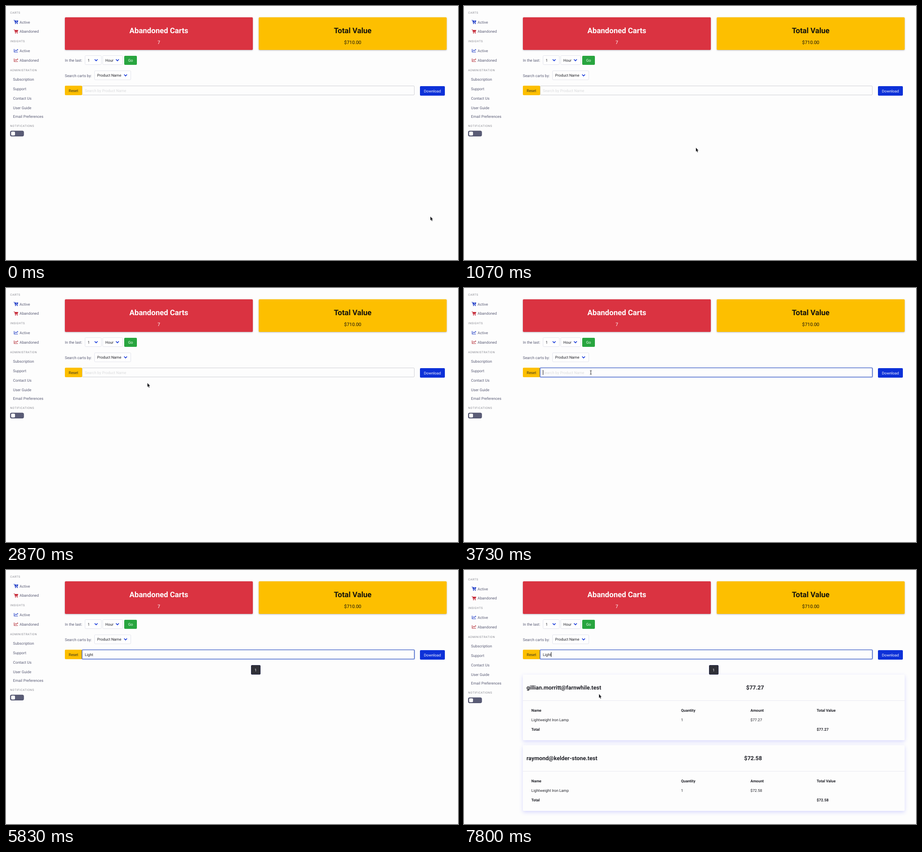
An HTML page with a canvas that plays this animation: 998x561 px, repeating every 8 s.

```html
<!DOCTYPE html>
<html lang="en">
<head>
<meta charset="utf-8">
<title>Abandoned carts</title>
<style>
html, body { margin: 0; width: 100%; height: 100%; overflow: hidden; background: #fdfdfd; }
canvas { display: block; width: 998px; height: 561px; }
</style>
</head>
<body>
<canvas id="stage" width="998" height="561"></canvas>
<script>
const ctx = document.getElementById('stage').getContext('2d');
const LOOP = 8000;
const BLUE = '#0d31d8', RED = '#da3341', GOLD = '#fdbf00', GREY = '#5b5d76', INK = '#212229';
const SMALL = 8.32;

const FOCUS = 3230, FIRST_KEY = 4300, KEY_GAP = 207, WORD = 'Light';
const PAGER = 5830, RESULTS = 5870, POINTER_BACK = 6500;

// time, x, y of the pointer
const TRACK = [
  [720, 937, 465], [1070, 512, 313], [1190, 512, 313], [1300, 442, 304],
  [2400, 442, 304], [3060, 280, 186.5], [POINTER_BACK, 280, 187],
  [6570, 278, 194], [6930, 272, 261], [6980, 272, 261], [7100, 245, 261],
  [7650, 245, 261], [7710, 264, 254], [7800, 298, 274]
];

const CARTS = [
  { mail: 'gillian.morritt@farnwhile.test', sum: '$77.27', x: 623 },
  { mail: 'raymond@kelder-stone.test', sum: '$72.58', x: 618.5 }
];

const clamp = v => Math.max(0, Math.min(1, v));

// y is the middle of the capital letters
function text(s, x, y, { size = SMALL, color = INK, weight = 400, align = 'left', gap = 0 } = {}) {
  ctx.font = `${weight} ${size}px Roboto, sans-serif`;
  ctx.letterSpacing = gap + 'px';
  ctx.textAlign = align;
  ctx.fillStyle = color;
  ctx.fillText(s, x, y + size * 0.355);
}

function box(x, y, w, h, fill, { r = 2, stroke, line = 1, shadow, blur = 0, drop = 0 } = {}) {
  ctx.save();
  ctx.beginPath();
  ctx.roundRect(x, y, w, h, r);
  if (shadow) {
    ctx.shadowColor = shadow;
    ctx.shadowBlur = blur;
    ctx.shadowOffsetY = drop;
  }
  ctx.fillStyle = fill;
  ctx.fill();
  ctx.restore();
  if (stroke) {
    ctx.strokeStyle = stroke;
    ctx.lineWidth = line;
    ctx.stroke();
  }
}

function path(points, color, width) {
  ctx.beginPath();
  points.forEach(([x, y]) => ctx.lineTo(x, y));
  ctx.strokeStyle = color;
  ctx.lineWidth = width;
  ctx.stroke();
}

function shape(points, color) {
  ctx.beginPath();
  points.forEach(([x, y]) => ctx.lineTo(x, y));
  ctx.closePath();
  ctx.fillStyle = color;
  ctx.fill();
}

function cartIcon(y, color, plus) {
  path([[17, y - 4], [18.8, y - 4], [20.3, y + 1.7], [25.6, y + 1.7]], color, 1);
  shape([[19, y - 3.4], [27, y - 3.4], [25.8, y + 0.6], [20, y + 0.6]], color);
  for (const x of [20.9, 24.9]) {
    ctx.beginPath();
    ctx.arc(x, y + 3.4, 1.1, 0, 7);
    ctx.fill();
  }
  if (plus) {
    path([[21.4, y - 1.5], [24.6, y - 1.5]], '#dfe4ff', 0.8);
    path([[23, y - 3], [23, y]], '#dfe4ff', 0.8);
  }
}

function chartIcon(y, color) {
  path([[18, y - 3.8], [18, y + 2.9], [26.4, y + 2.9]], color, 1.1);
  path([[19.6, y + 0.6], [21.6, y - 1.4], [23.2, y], [25.9, y - 2.7]], color, 1.1);
  shape([[24, y - 3.3], [26.4, y - 3.3], [26.4, y - 0.9]], color);
}

function sidebar() {
  const head = (s, y) => text(s, 9.3, y, { size: 6.2, color: '#83848c', gap: 0.65 });
  const link = (s, x, y) => text(s, x, y, { color: GREY });
  head('CARTS', 14.5);
  cartIcon(35.3, '#1a38c4', true);
  link('Active', 30, 35.7);
  cartIcon(56.3, '#c72f3d', false);
  link('Abandoned', 30, 56.5);
  head('INSIGHTS', 77.8);
  chartIcon(98.8, '#1a38c4');
  link('Active', 30, 99.2);
  chartIcon(119.8, '#b5303a');
  link('Abandoned', 30, 120);
  head('ADMINISTRATION', 141.3);
  [['Subscription', 162.4], ['Support', 183.3], ['Contact Us', 204.1],
   ['User Guide', 224.9], ['Email Preferences', 244.4]].forEach(([s, y]) => link(s, 15.5, y));
  head('NOTIFICATIONS', 264.9);
  box(9.5, 276, 29.5, 11.5, '#5a5c76', { r: 2.5, stroke: '#484a66' });
  box(11.3, 277.5, 8.6, 8.5, '#fdfdfd', { r: 2 });
}

function select(label, x, y, w) {
  box(x + 0.5, y + 0.5, w, 20, '#fefefe', { stroke: '#e3e4ec' });
  text(label, x + 6.3, y + 10.7);
  const c = x + w - 11;
  path([[c - 3.2, y + 8.8], [c, y + 12], [c + 3.2, y + 8.8]], BLUE, 1.6);
}

function summary(x, fill, color, title, value) {
  box(x, 25, 415, 72, fill, { r: 2, shadow: 'rgba(60,60,90,.35)', blur: 3, drop: 1 });
  text(title, x + 207.5, 54, { size: 16.64, weight: 700, color, align: 'center' });
  text(value, x + 207.5, 80.2, { size: 10.4, color, align: 'center' });
}

function search(t) {
  box(130, 176, 38, 21, GOLD);
  text('Reset', 149, 187, { color: '#3b3420', align: 'center' });

  const focus = clamp((t - FOCUS) / 100);
  box(168.5, 176.5, 733, 20, '#fdfdfd', { r: 1.5, stroke: '#cfd0d6' });
  if (focus) {
    ctx.globalAlpha = focus;
    box(168, 176.5, 734, 20.5, '#fdfdfd', { r: 1.5, stroke: 'rgba(70,105,225,.35)', line: 2.6 });
    box(168, 176.5, 733.5, 20, '#fdfdfd', { r: 1.5, stroke: '#3557bd', line: 1.2 });
    ctx.globalAlpha = 1;
  }

  const count = t < FIRST_KEY ? 0 : Math.min(5, 1 + Math.floor((t - FIRST_KEY) / KEY_GAP));
  const typed = WORD.slice(0, count);
  if (count) text(typed, 174, 186.9);
  else text('Search by Product Name', 174, 186.9, { color: '#dadbdd' });

  const blink = t < FIRST_KEY ? (t - FOCUS) % 1060 < 540 : t < 5630 || t > 6630;
  if (t >= FOCUS && blink) {
    const x = count ? 174 + ctx.measureText(typed).width : 174;
    ctx.fillStyle = INK;
    ctx.fillRect(Math.round(x), 181, 1, 11);
  }

  box(914, 177, 55, 21, BLUE);
  text('Download', 941.5, 187.6, { color: '#f6f7ff', align: 'center', size: 8.4 });
}

function cart({ mail, sum, x }, y) {
  const bold = { weight: 700 };
  box(130, y, 843, 145, '#fdfdfd', { r: 2, shadow: 'rgba(90,95,255,.24)', blur: 8, drop: 3 });
  ctx.fillStyle = '#e9e9f1';
  ctx.fillRect(130, y + 57, 843, 1);
  text(mail, 138, y + 28.4, { size: 12.48, weight: 700 });
  text(sum, x, y + 28.4, { size: 12.48, weight: 700 });
  [['Name', 148.8], ['Quantity', 479.3], ['Amount', 632.5], ['Total Value', 778.8]]
    .forEach(([s, left]) => text(s, left, y + 79, bold));
  [['Lightweight Iron Lamp', 148.8], ['1', 479.3], [sum, 632.5]]
    .forEach(([s, left]) => text(s, left, y + 99.8));
  text('Total', 148.8, y + 120.7, bold);
  text(sum, 778.8, y + 120.7, bold);
}

function pointerAt(t) {
  if (t <= TRACK[0][0]) return TRACK[0].slice(1);
  const i = TRACK.findIndex(k => k[0] > t);
  if (i < 0) return TRACK[TRACK.length - 1].slice(1);
  const [t0, x0, y0] = TRACK[i - 1], [t1, x1, y1] = TRACK[i];
  let p = (t - t0) / (t1 - t0);
  if (t < POINTER_BACK) p = p * p * (3 - 2 * p);
  return [x0 + (x1 - x0) * p, y0 + (y1 - y0) * p];
}

function pointer(t) {
  if (t >= FIRST_KEY && t < POINTER_BACK) return;
  const [x, y] = pointerAt(t);
  const inField = x > 168 && x < 902 && y > 176 && y < 198;
  const onMail = t > RESULTS && x < 304 && y > 251 && y < 268;
  ctx.save();
  ctx.translate(x, y);
  if (t >= POINTER_BACK) ctx.globalAlpha = clamp((t - POINTER_BACK) / 140);
  if (inField || onMail) {
    const bar = [[0, -3.4], [0, 3.4]];
    path(bar, '#fff', 2.4);
    path(bar, '#26272b', 1);
    for (const end of [-3.8, 3.8]) path([[-2, end], [2, end]], '#26272b', 0.9);
  } else {
    const arrow = [[0, 0], [0, 8.4], [1.8, 6.8], [3.2, 10], [4.6, 9.4], [3.3, 6.3], [5.8, 6.2]];
    ctx.lineJoin = 'round';
    path([...arrow, arrow[0]], '#fff', 1.6);
    shape(arrow, '#1d1e22');
  }
  ctx.restore();
}

function draw(t) {
  ctx.fillStyle = '#fdfdfd';
  ctx.fillRect(0, 0, 998, 561);

  ctx.save();
  if (t >= RESULTS) ctx.translate(0, 6);
  sidebar();
  ctx.restore();

  summary(130, RED, '#fff', 'Abandoned Carts', '7');
  summary(558, GOLD, '#14130d', 'Total Value', '$710.00');

  text('In the last:', 130, 120.3, { color: GREY });
  select('1', 174, 109, 36);
  select('Hour', 213, 109, 44);
  box(261, 110, 28, 20, '#28a53f');
  text('Go', 275, 120.3, { color: '#f4fff6', align: 'center' });
  text('Search carts by:', 130, 153.6, { color: GREY });
  select('Product Name', 195, 142.5, 80);

  search(t);
  if (t >= RESULTS) CARTS.forEach((c, i) => cart(c, 231 + i * 156));
  if (t >= PAGER) {
    box(541.5, 210.5, 20, 20, '#303138', { r: 1.5, stroke: '#24284a' });
    text('1', 551.2, 220.8, { color: '#f2f2f4', align: 'center' });
  }
  pointer(t);
}

ctx.textRendering = 'geometricPrecision';
const start = performance.now();
function tick() {
  draw((performance.now() - start) % LOOP);
  requestAnimationFrame(tick);
}
tick();
</script>
</body>
</html>
```
